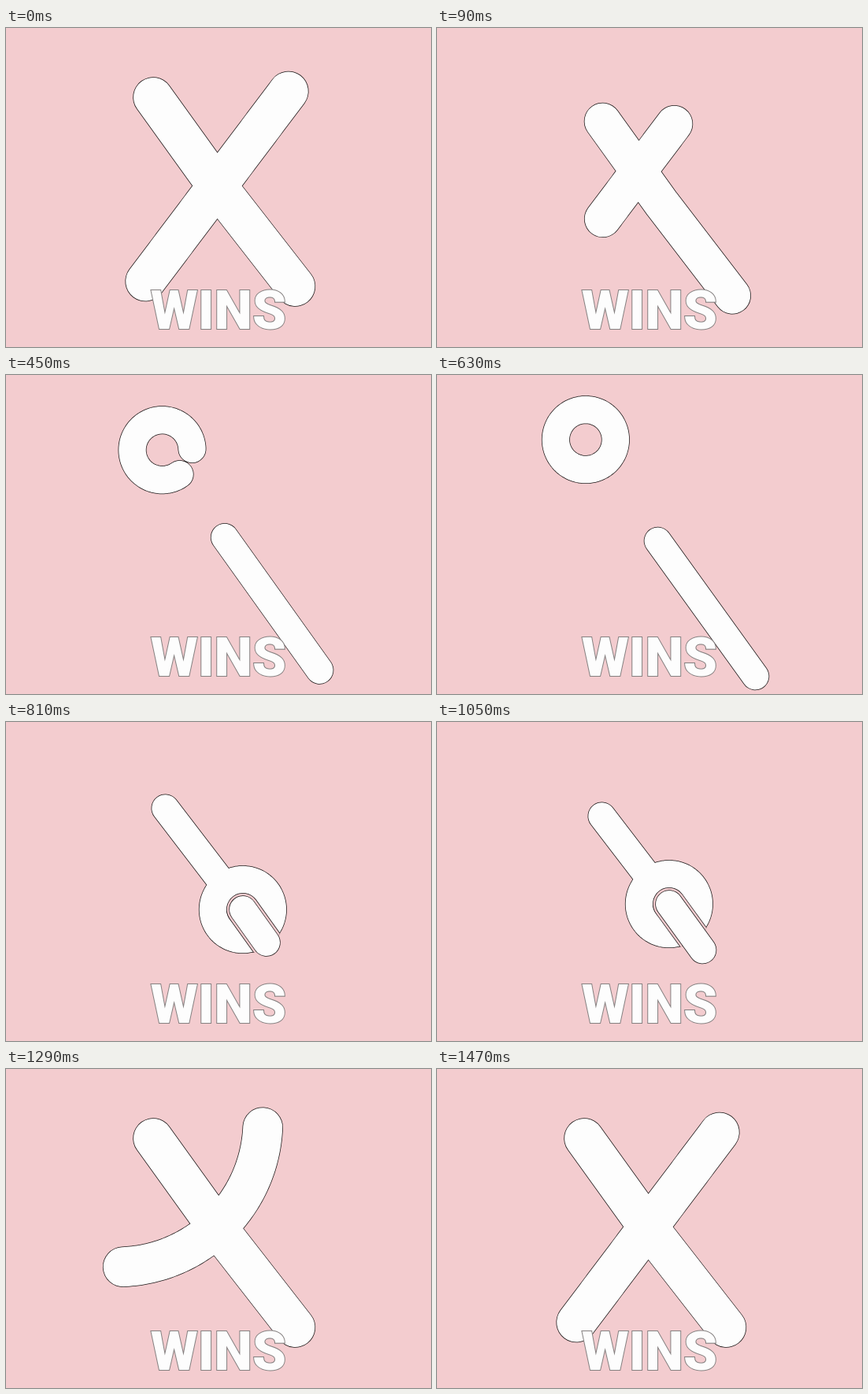
Write an HTML page with a canvas that moves like this. It is 540x405 px and loops after 1.83 s.

```html
<!DOCTYPE html>
<html lang="en">
<head>
<meta charset="utf-8">
<title>X wins</title>
<style>
  html, body { margin: 0; height: 100%; overflow: hidden; background: #f3cccf; }
  canvas { position: absolute; left: 0; top: 0; }
  p {
    position: absolute; left: 0; top: 324px; width: 540px; margin: 0;
    font: 900 69px/70px Impact, Roboto, "Noto Sans", "Open Sans", sans-serif;
    font-stretch: condensed; text-align: center;
    color: #fdfdfd; -webkit-text-stroke: 2px #858080; paint-order: stroke fill;
  }
</style>
</head>
<body>
<canvas id="stage" width="540" height="405"></canvas>
<p>WINS</p>
<script>
const ctx = document.getElementById('stage').getContext('2d');
const PINK = '#f3cccf', WHITE = '#fdfdfd', LINE = '#1c1818';
const LOOP = 1830, STEP = 30, RADIUS = 38, RING = 2 * Math.PI * RADIUS;

const clamp = u => Math.max(0, Math.min(1, u));
const smooth = u => u * u * (3 - 2 * u);
const cubicIn = u => u ** 3;
const quadOut = u => 1 - (1 - u) ** 2;
const progress = (t, from, to) => clamp((t - from) / (to - from));

// time, easing towards it, stroke pivot, bar start, bar bend, bar end, line width
const X_POSE = [268, 201, 187, 88, 268, 200.5, 367.5, 328, 50];
const POSES = [
  [0, smooth, X_POSE],
  [270, smooth, [222, 128, 277.5, 205.5, 337.5, 289.5, 397.5, 373.5, 34.5]],
  [630, cubicIn, [211, 113, 280.5, 210.5, 342.5, 296.5, 404.5, 382.5, 34.5]],
  [810, smooth, [323, 269, 202.5, 109.5, 260, 189.5, 331, 280, 34.5]],
  [1050, quadOut, [317, 262, 209.5, 119.5, 267, 199.5, 337.5, 289.5, 34.5]],
  [1080, smooth, [317, 262, 209.5, 119.5, 267, 199.5, 337.5, 289.5, 34.5]],
  [1290, smooth, X_POSE],
  [LOOP, smooth, X_POSE]
];

function poseAt(t) {
  const i = POSES.findIndex(p => p[0] > t);
  const [from, , a] = POSES[i - 1], [to, ease, b] = POSES[i];
  const u = ease(progress(t, from, to));
  return a.map((v, k) => v + (b[k] - v) * u);
}

function polyline(points) {
  const path = new Path2D();
  points.forEach(p => path.lineTo(...p));
  return path;
}

// Constant-curvature stroke through the pivot, between two arc lengths
function curve(px, py, tilt, bend, from, to) {
  const c = Math.cos(tilt), s = Math.sin(tilt), k = bend || 1e-6;
  return polyline(Array.from({ length: 81 }, (_, i) => {
    const l = from + (to - from) * i / 80;
    const along = Math.sin(k * l) / k, across = (1 - Math.cos(k * l)) / k;
    return [px + along * c - across * s, py - along * s - across * c];
  }));
}

function curveAt(t, px, py) {
  const rad = Math.PI / 180;
  if (t < 180) {
    const half = 151 * (1 - smooth(t / 180));
    return curve(px, py, 53 * rad, 0, -half, half);
  }
  if (t <= 1080) {
    const drawn = RING * smooth(progress(t, 180, 540));
    return curve(px, py, 35.6 * rad, 1 / RADIUS, -drawn, 0);
  }
  const swing = -0.7;
  const theta = t < 1380
    ? Math.PI + (swing - Math.PI) * progress(t, 1080, 1380) ** 1.32
    : swing * (1 - smooth(progress(t, 1380, 1470)));
  const roll = Math.abs(theta) / Math.PI;
  const half = 151 - (theta > 0 ? 31.6 * roll ** 0.6 : 0);
  const shift = 8 * Math.sin(theta);
  return curve(px, py, (53 - 17.4 * roll ** 0.4) * rad, theta / half, shift - half, shift + half);
}

function stroke(path, width, color) {
  ctx.lineWidth = width;
  ctx.strokeStyle = color;
  ctx.stroke(path);
}

function outlined(paths, width, fill) {
  paths.forEach(p => stroke(p, width + 1.5, LINE));
  paths.forEach(p => stroke(p, width, fill));
}

function draw(t) {
  const [px, py, ax, ay, mx, my, bx, by, width] = poseAt(t);
  const loop = curveAt(t, px, py);
  const bar = polyline([[ax, ay], [mx, my], [bx, by]]);
  const gap = t < 540 ? 0 : 3 * (1 - progress(t, 1080, 1170));
  ctx.fillStyle = PINK;
  ctx.fillRect(0, 0, 540, 405);
  ctx.lineCap = ctx.lineJoin = 'round';
  if (!gap) return outlined([loop, bar], width, WHITE);

  // The bar runs behind the near rim of the ring and in front of the far rim
  const cx = px - 22, cy = py - 31;
  const inside = (cx - ax) * 0.58 + (cy - ay) * 0.81 > 0;
  const front = inside ? polyline([[cx, cy], [bx, by]]) : bar;
  outlined(inside ? [loop, polyline([[ax, ay], [cx, cy]])] : [loop], width, WHITE);
  ctx.save();
  ctx.beginPath();
  ctx.arc(cx, cy, RADIUS + width / 2 + 1, 0, 7);
  ctx.clip();
  outlined([front], width + 2 * gap, PINK);
  ctx.restore();
  outlined([front], width - 0.5, WHITE);
}

const start = performance.now();
function tick() {
  const t = (performance.now() - start) % LOOP;
  draw(Math.floor(t / STEP + 0.1) * STEP % LOOP);
  requestAnimationFrame(tick);
}
tick();
</script>
</body>
</html>
```
